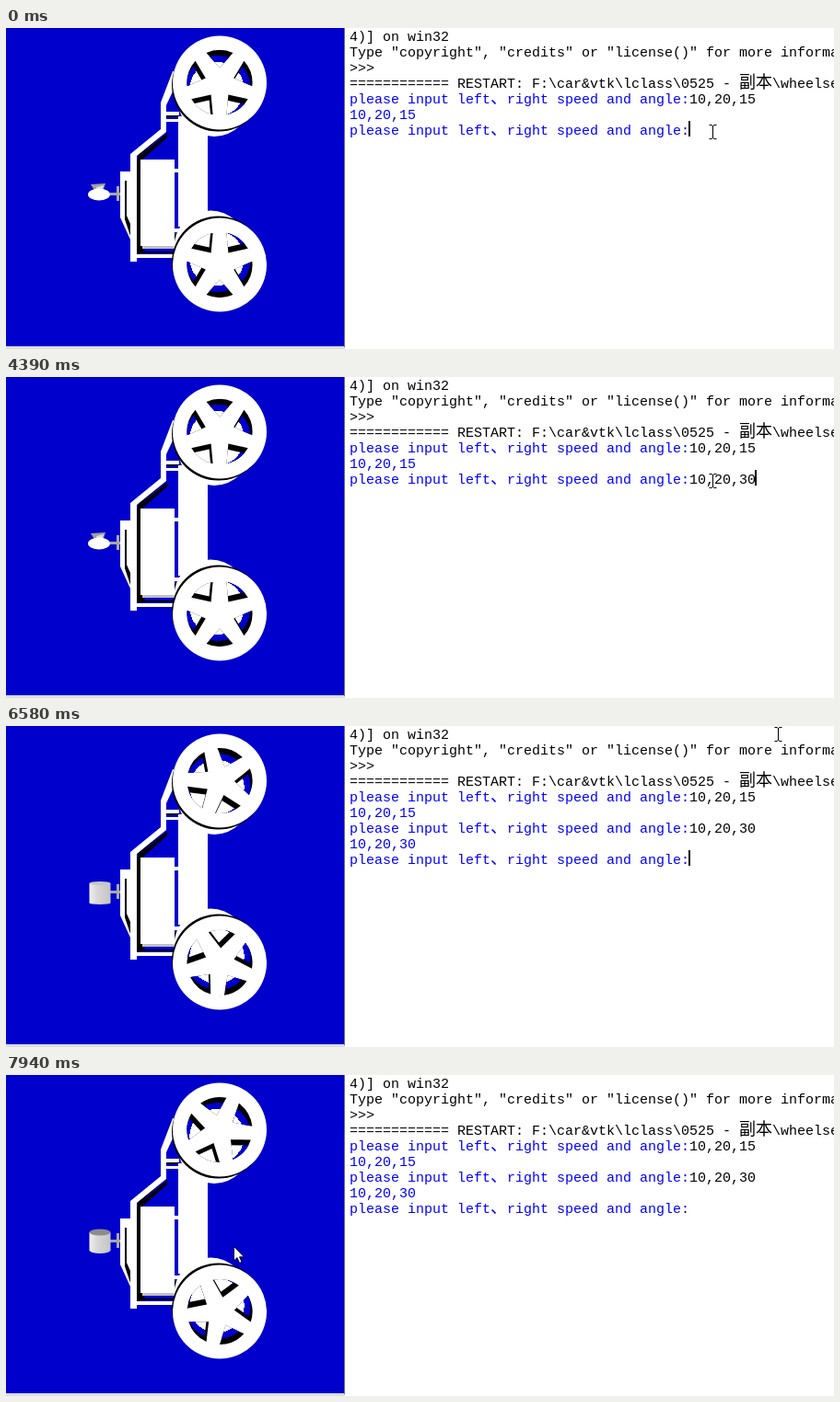
These frames come from a looping animation (899x349 px, 8 s). An HTML page:

```html
<!DOCTYPE html>
<html lang="en">
<head>
<meta charset="utf-8">
<title>Car simulation and shell</title>
<style>
html, body { margin: 0; width: 100%; height: 100%; overflow: hidden; background: #fff; }
svg { display: block; width: 899px; height: 349px; }
text { font: 15px "Liberation Mono", "Courier New", monospace; white-space: pre; }
.out { fill: #00f; }
.in { fill: #000; }
.cjk { font: 300 18px "Noto Sans CJK SC", "Noto Sans CJK", sans-serif; }
</style>
</head>
<body>
<svg viewBox="0 0 899 349">
  <defs>
    <radialGradient id="seeTop" gradientUnits="userSpaceOnUse" cx="-1" cy="1" r="40">
      <stop offset=".74" stop-color="#fff"/><stop offset=".74" stop-color="#0000cc"/>
    </radialGradient>
    <radialGradient id="seeBottom" gradientUnits="userSpaceOnUse" cx="-1" cy="-1" r="40">
      <stop offset=".74" stop-color="#fff"/><stop offset=".74" stop-color="#0000cc"/>
    </radialGradient>
    <linearGradient id="drum">
      <stop offset="0" stop-color="#f0f0f0"/><stop offset=".35" stop-color="#d8d8d8"/>
      <stop offset="1" stop-color="#c4c4c4"/>
    </linearGradient>
    <clipPath id="holesTop"><path/></clipPath>
    <clipPath id="holesBottom"><path/></clipPath>
  </defs>

  <!-- 3D view -->
  <path fill="#dcdcdc" d="M0 346H368V349H0z"/>
  <path fill="#0000cc" d="M0 0H367V346H0z"/>
  <path fill="#70707c" d="M367 0H368V347H367z"/>

  <!-- Chassis -->
  <path fill="#000" d="M183 50L174 82V112L143 142V138L170 112V80z"/>
  <path fill="#fff" d="M181 47H188V54L174 84V113L142 139V157H135V137L168 110V81z"/>
  <path fill="#000" d="M143 142L175 114V119L148 143V238H143z"/>
  <path fill="#fff" d="M174 91H188V95H174zM174 99H188V102H174z"/>
  <path fill="#000" d="M174 95H188V97H174z"/>
  <path fill="#fff" d="M124 156H142V254H135V230L124 206z"/>
  <path fill="#000" d="M129 166H131V204L135 213V226L129 208z"/>
  <path fill="#000" d="M142 143H145V250H142zM142 236H148L152 245H142z"/>
  <path fill="#fff" d="M146 143H183V237H146z"/>
  <path fill="#c0c0c0" d="M148 237H184V240H148z"/>
  <path fill="#fff" d="M183 153H188V157H183zM183 218H188V222H183zM142 246H188V250H142z"/>
  <path fill="#000" d="M145 243H186V245H145zM183 224H188V235H183z"/>
  <path fill="#fff" d="M187 96H219V216H187z"/>
  <path fill="#a8a8a8" d="M113 179H124V182H113zM120 172H123V188H120z"/>
  <g id="castor"></g>

  <!-- Wheels -->
  <circle cx="226" cy="79" r="39" fill="#fff"/>
  <circle cx="230.5" cy="62" r="50.5"/>
  <circle cx="232" cy="59.5" r="51" fill="#fff"/>
  <circle cx="222" cy="238" r="39.5" fill="#fff"/>
  <circle cx="230.5" cy="255" r="50.5"/>
  <circle cx="232" cy="257.5" r="51" fill="#fff"/>
  <g transform="translate(232 59.5)"><g clip-path="url(#holesTop)">
    <path d="M-40-40H40V40H-40z"/>
    <path id="backTop" fill="url(#seeTop)" transform="translate(-2 6)"/>
  </g></g>
  <g transform="translate(232 257.5)"><g clip-path="url(#holesBottom)">
    <path d="M-40-40H40V40H-40z"/>
    <path id="backBottom" fill="url(#seeBottom)" transform="translate(-2 -6)"/>
  </g></g>

  <!-- Shell -->
  <text x="373" y="14">4)] on win32</text>
  <text x="373" y="31">Type "copyright", "credits" or "license()" for more information</text>
  <text x="373" y="48">&gt;&gt;&gt;</text>
  <text x="373" y="65">============ RESTART: F:\car&amp;vtk\lclass\0525 - <tspan class="cjk">副本</tspan>\wheelse</text>
  <text x="373" y="82" class="out">please input left<tspan class="cjk">、</tspan>right speed and angle:<tspan class="in">10,20,15</tspan></text>
  <text x="373" y="99" class="out">10,20,15</text>
  <text x="373" y="116" class="out">please input left<tspan class="cjk">、</tspan>right speed and angle:<tspan class="in" id="typed"></tspan></text>
  <g id="reply">
    <text x="373" y="133" class="out">10,20,30</text>
    <text x="373" y="150" class="out">please input left<tspan class="cjk">、</tspan>right speed and angle:</text>
  </g>
  <rect id="caret" width="2" height="17"/>

  <path id="beam" fill="none" stroke="#000" d="M-3.5-7.5H-1L.5-6.5 2-7.5H4.5M.5-6.5V6.5M-3.5 7.5H-1L.5 6.5 2 7.5H4.5"/>
  <path id="arrow" fill="#fff" stroke="#000" stroke-width=".9" d="M.5.5V16L4 12.6 6.6 18.4 9 17.3 6.5 11.8H11.4z"/>
</svg>
<script>
const LOOP = 8000;
const ENTER = 5490;
const keys = [230, 550, 1250, 1860, 2110, 2580, 3120, 4310];
const blinks = [550, 780, 1390, 1710, 2330, 2640, 3210, 3530, 4080, 4390,
  5020, 5330, 5870, 6200, 6820, 7090, 7720];
const turns = [6030, 6430, 6740, 7090, 7410, 7780];
const beamPath = [[0, 767, 113], [6430, 790, 72], [6500, 822, 32], [6580, 838, 9], [6660, 852, 4]];
const arrowPath = [[7500, 65, 2], [7570, 112, 58], [7640, 172, 122], [7860, 232, 176], [7940, 247, 186]];

const $ = id => document.getElementById(id);
const passed = (list, t) => list.filter(at => at <= t).length;
const show = (el, on) => el.setAttribute('visibility', on ? 'visible' : 'hidden');

function polar(r, deg) {
  const a = deg * Math.PI / 180;
  return (r * Math.cos(a)).toFixed(2) + ' ' + (r * Math.sin(a)).toFixed(2);
}

// Five openings around a star-shaped hub.
function holes(turn) {
  let d = '';
  for (let i = 0; i < 5; i++) {
    const a = turn + 72 * i;
    d += `M${polar(16, a)}L${polar(35.5, a - 24)}A35.5 35.5 0 0 1 ${polar(35.5, a + 24)}Z`;
  }
  return d;
}

function setWheel(side, turn) {
  const d = holes(turn);
  document.querySelector(`#holes${side} path`).setAttribute('d', d);
  $('back' + side).setAttribute('d', d);
}

// The castor swings from its end face to its side and back.
function castor(step) {
  if (step === 0)
    return '<path fill="#a0a0a0" d="M92 170L108 169 105 178H97z"/>' +
      '<path fill="#e0e0e0" d="M98 173L106 171 104 178H99z"/>' +
      '<ellipse cx="101" cy="181" rx="12" ry="6.5" fill="#fff"/>';
  if (step === 3)
    return '<path fill="#fff" d="M93 169H113V192H93L90 189V173z"/>' +
      '<path fill="#c8c8c8" d="M93 191H113V193H93zM112 170H114V192H112z"/>';
  const lid = [0, 5, 2, 0, 1.5, 2.5, 3.5][step];
  const low = step < 3 ? 1.5 : lid;
  return `<path fill="url(#drum)" d="M90.5 171V${194 - low}A11.5 ${low} 0 0 0 113.5 ${194 - low}V171z"/>` +
    `<ellipse cx="102" cy="171" rx="11.5" ry="${lid}" fill="${step < 3 ? '#c8c8c8' : '#8c8c8c'}"/>`;
}

function place(el, path, t, end) {
  const spot = path.filter(p => p[0] <= t).pop();
  show(el, spot && t < end);
  if (spot) el.setAttribute('transform', `translate(${spot[1]} ${spot[2]})`);
}

let lastStep = -1;
function draw(t) {
  const count = passed(keys, t);
  const entered = t >= ENTER;
  $('typed').textContent = '10,20,30'.slice(0, count);
  show($('reply'), entered);
  $('caret').setAttribute('x', 741 + (entered ? 0 : 9 * count));
  $('caret').setAttribute('y', entered ? 135 : 101);
  show($('caret'), passed(blinks, t) % 2 === 0);

  const step = passed(turns, t);
  if (step !== lastStep) {
    setWheel('Top', 10 * step - 90);
    setWheel('Bottom', 20 * step + 90);
    $('castor').innerHTML = castor(step);
    lastStep = step;
  }
  place($('beam'), beamPath, t, 6740);
  place($('arrow'), arrowPath, t, LOOP);
}

const start = performance.now();
function tick() {
  draw((performance.now() - start) % LOOP);
  requestAnimationFrame(tick);
}
tick();
</script>
</body>
</html>
```
